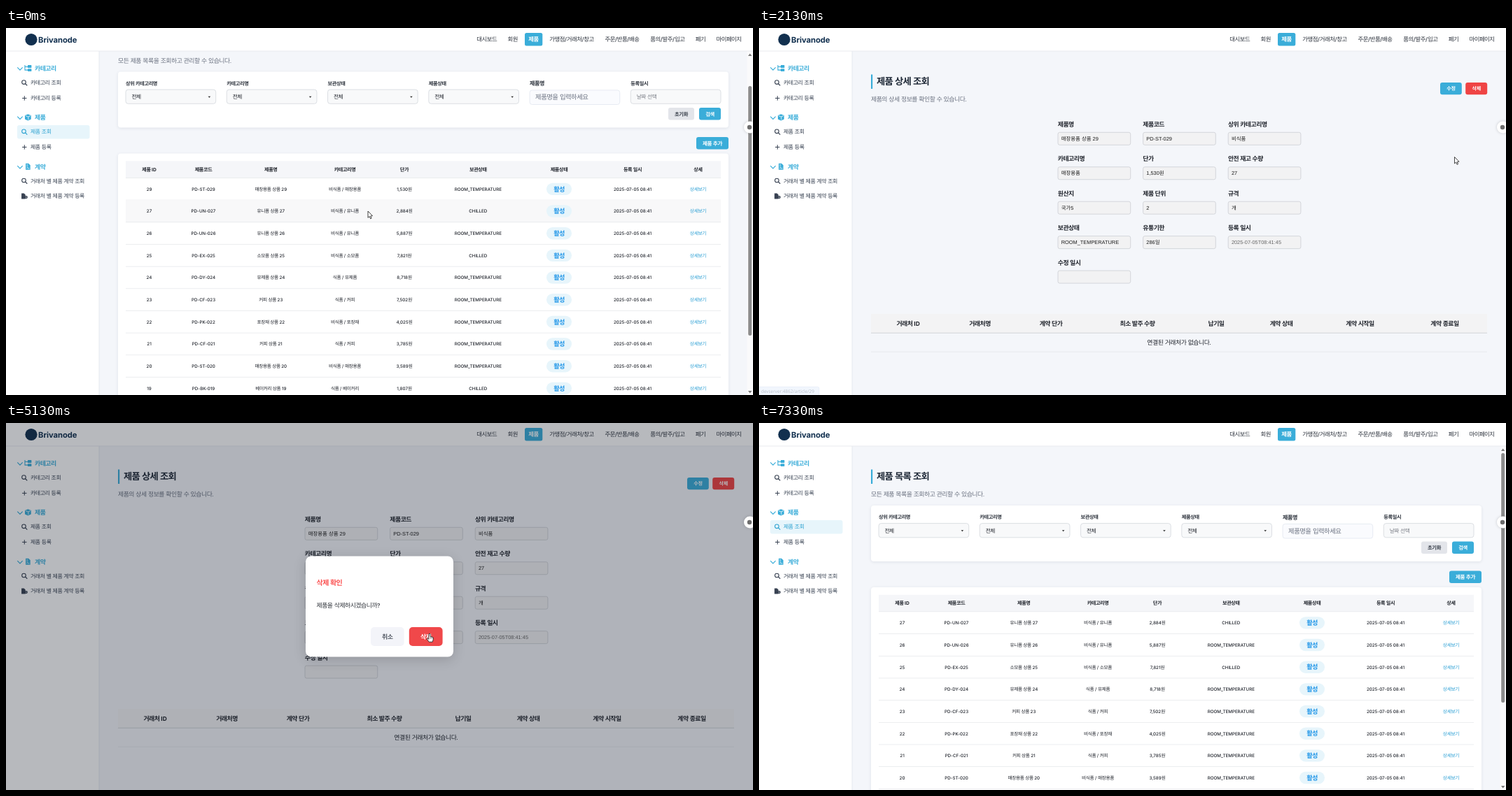
Animation of 1067x525 px, one loop 8.27 s. Source, as an HTML page with a canvas:

```html
<!DOCTYPE html>
<html lang="ko">
<head>
<meta charset="utf-8">
<title>제품 관리</title>
<style>
html, body { margin: 0; width: 100%; height: 100%; overflow: hidden; background: #f4f6fa; }
canvas { display: block; }
</style>
</head>
<body>
<canvas id="stage" width="1067" height="525"></canvas>
<script>
const ctx = document.getElementById('stage').getContext('2d');
const W = 1067, H = 525, LOOP = 8270, TICK = 1000 / 15;
const BLUE = '#3aadd9', INK = '#20242c', GREY = '#6b7280', LINE = '#e3e5e9', PAGE = '#f4f6fa';
const SCROLL = 55.5, ROW_H = 31.67;

const clamp = v => Math.max(0, Math.min(1, v));
const ramp = (t, a, b) => clamp((t - a) / (b - a));
const ease = p => p * p * (3 - 2 * p);
const mix = (a, b, p) => `rgb(${a.map((v, i) => Math.round(v + (b[i] - v) * p))})`;

// ---- drawing helpers ----
function rect(x, y, w, h, fill) {
  ctx.fillStyle = fill;
  ctx.fillRect(x, y, w, h);
}

function box(x, y, w, h, r, fill, stroke) {
  ctx.beginPath();
  ctx.roundRect(x, y, w, h, r);
  ctx.fillStyle = fill;
  ctx.fill();
  if (stroke) {
    ctx.strokeStyle = stroke;
    ctx.lineWidth = 0.7;
    ctx.stroke();
  }
}

function shadowBox(x, y, w, h, r, blur, dy, shade) {
  ctx.save();
  ctx.shadowColor = shade;
  ctx.shadowBlur = blur;
  ctx.shadowOffsetY = dy;
  box(x, y, w, h, r, '#fff');
  ctx.restore();
}

function disc(x, y, r, fill) {
  ctx.beginPath();
  ctx.arc(x, y, r, 0, 7);
  ctx.fillStyle = fill;
  ctx.fill();
}

function poly(points, fill, stroke, width = 1, closed = true) {
  ctx.beginPath();
  points.forEach(([x, y]) => ctx.lineTo(x, y));
  if (closed) ctx.closePath();
  if (fill) { ctx.fillStyle = fill; ctx.fill(); }
  if (stroke) { ctx.strokeStyle = stroke; ctx.lineWidth = width; ctx.stroke(); }
}

// Hangul is set a little tighter, Latin a little smaller
function setFont(run, size, weight) {
  const hangul = /[가-힣]/.test(run);
  ctx.font = `${weight} ${hangul ? size : size * 0.94}px Inter, "Noto Sans CJK KR", sans-serif`;
  ctx.letterSpacing = `${hangul ? -0.055 * size : -0.005 * size}px`;
}

// y is the vertical middle of the line; align 0 = left, 0.5 = centre
function text(s, x, y, size, color = INK, weight = 400, align = 0) {
  const runs = s.match(/[가-힣]+|[^가-힣]+/g);
  const widths = runs.map(r => (setFont(r, size, weight), ctx.measureText(r).width));
  x -= align * widths.reduce((a, b) => a + b, 0);
  ctx.fillStyle = color;
  runs.forEach((r, i) => {
    setFont(r, size, weight);
    ctx.fillText(r, x, y + size * 0.36);
    x += widths[i];
  });
}

function plain(s, x, y, size, color, family) {
  ctx.font = `${size}px ${family}, "Noto Sans CJK KR", sans-serif`;
  ctx.letterSpacing = '0px';
  ctx.fillStyle = color;
  ctx.fillText(s, x, y + size * 0.36);
}

function button(label, x, y, w, h, fill, color = '#fff', size = 7.1, r = 3) {
  box(x, y, w, h, r, fill);
  text(label, x + w / 2, y + h / 2 + 0.2, size, color, 700, 0.5);
}

// ---- icons, drawn around their centre ----
const icons = {
  search(x, y, c) {
    ctx.beginPath();
    ctx.arc(x - 0.8, y - 0.8, 2.8, 0, 7);
    ctx.strokeStyle = c;
    ctx.lineWidth = 1.1;
    ctx.stroke();
    poly([[x + 1.3, y + 1.3], [x + 4, y + 4]], null, c, 1.3, false);
  },
  plus(x, y, c) {
    rect(x - 3.2, y - 0.5, 6.4, 1, c);
    rect(x - 0.5, y - 3.2, 1, 6.4, c);
  },
  tree(x, y, c) {
    poly([[x - 4.4, y - 4.5], [x - 4.4, y + 2.6], [x, y + 2.6]], null, c, 1.1, false);
    rect(x - 4.4, y - 2.6, 4, 1.1, c);
    box(x - 0.4, y - 4.4, 5.4, 3.9, 0.6, c);
    box(x - 0.4, y + 0.7, 5.4, 3.9, 0.6, c);
  },
  cube(x, y, c) {
    poly([[x, y - 4.6], [x + 4.4, y - 2.7], [x + 4.4, y + 2.7], [x, y + 4.6], [x - 4.4, y + 2.7], [x - 4.4, y - 2.7]], c);
    poly([[x - 3.6, y - 2.3], [x, y - 0.8], [x + 3.6, y - 2.3]], null, '#fff', 0.8, false);
    rect(x + 0.1, y - 0.8, 0.8, 4.4, '#fff');
  },
  paper(x, y, c) {
    poly([[x - 3.3, y - 4.5], [x + 0.8, y - 4.5], [x + 3.3, y - 2], [x + 3.3, y + 4.5], [x - 3.3, y + 4.5]], c);
    rect(x - 2.1, y - 2.9, 2, 0.7, '#fff');
    rect(x - 2.1, y - 1.3, 2, 0.7, '#fff');
    poly([[x - 2, y + 2.8], [x - 0.8, y + 0.8], [x + 0.3, y + 2.6], [x + 2.2, y + 2.6]], null, '#fff', 0.7, false);
  },
  sign(x, y, c) {
    poly([[x - 4.2, y - 4], [x - 0.6, y - 4], [x + 1.4, y - 2], [x + 1.4, y + 4], [x - 4.2, y + 4]], c);
    disc(x + 2.5, y + 1.6, 2.1, c);
    disc(x + 2.5, y + 1.6, 0.7, '#fff');
  }
};

// ---- frame of the app ----
const nav = [['대시보드', 686.7], ['회원', 723.7], ['제품', 753.5], ['가맹점/거래처/창고', 808], ['주문/반품/배송', 880],
  ['품의/발주/입고', 944.8], ['폐기', 992], ['마이페이지', 1032.5]];

function header() {
  rect(0, 0, W, 33, '#fff');
  rect(0, 32.6, W, 0.8, '#e4e7ec');
  disc(36, 16.5, 8.6, '#12304f');
  text('Brivanode', 46, 16.6, 12, '#12304f', 700);
  box(741, 7, 25.3, 18.5, 2.5, BLUE);
  nav.forEach(([s, x]) => text(s, x, 16, 8.4, s === '제품' ? '#fff' : '#2b313b', s === '제품' ? 700 : 500, 0.5));
}

const groups = [['카테고리', 57.5, 'tree'], ['제품', 127.8, 'cube'], ['계약', 198.3, 'paper']];
const links = [['카테고리 조회', 78.4, 'search'], ['카테고리 등록', 100.4, 'plus'], ['제품 조회', 148.6, 'search'],
  ['제품 등록', 170.4, 'plus'], ['거래처 별 제품 계약 조회', 218.8, 'search'], ['거래처 별 제품 계약 등록', 240.5, 'sign']];

function sidebar(active, glow) {
  rect(0, 33, 133, H, '#fff');
  rect(132.6, 33, 0.8, H, '#e2e6ec');
  groups.forEach(([s, y, icon]) => {
    poly([[16.3, y - 1.2], [20, y + 2.6], [23.7, y - 1.2]], null, BLUE, 1.2, false);
    icons[icon](31.4, y, BLUE);
    text(s, 41, y, 8.9, BLUE, 700);
  });
  box(16, 139, 103.5, 19.4, 3, `rgba(231,245,251,${glow})`);
  links.forEach(([s, y, icon]) => {
    const c = active && s === '제품 조회' ? '#2ea3d1' : '#374151';
    icons[icon](26.3, y, c);
    text(s, 35, y, 7.95, c, 400);
  });
}

function heading(title, note, dy) {
  rect(160, 66.5 - dy, 2.2, 20.5, BLUE);
  text(title, 168, 76.6 - dy, 13.33, '#1f2937', 700);
  text(note, 160, 102 - dy, 8.89, GREY);
}

// ---- list page ----
const kinds = { ST: '매장용품', UN: '유니폼', EX: '소모품', DY: '유제품', CF: '커피', PK: '포장재', BK: '베이커리' };
const goods = [[29, 'ST', '1,530'], [27, 'UN', '2,884', 1], [26, 'UN', '5,887'], [25, 'EX', '7,821', 1], [24, 'DY', '8,718'],
  [23, 'CF', '7,502'], [22, 'PK', '4,025'], [21, 'CF', '3,785'], [20, 'ST', '3,589'], [19, 'BK', '1,807', 1]];
const heads = ['제품 ID', '제품코드', '제품명', '카테고리명', '단가', '보관상태', '제품상태', '등록 일시', '상세'];
const fullCols = [204.5, 282, 378.3, 484, 569, 674.3, 790, 895, 988.5];
const emptyCols = [218, 316, 411, 514, 608.7, 696, 798.7, 903.6, 993];
const filters = ['상위 카테고리명', '카테고리명', '보관상태', '제품상태', '제품명', '등록일시'];

function filterPanel(inner, dy) {
  const step = (inner + 15.56) / 6, w = step - 15.56, right = 171 + inner;
  shadowBox(160, 118 - dy, inner + 22, 80, 4, 4, 1, 'rgba(30,50,80,.1)');
  filters.forEach((s, i) => {
    const x = 171 + i * step, y = 143.6 - dy, mid = y + 10.2;
    text(s, x, 134.6 - dy, i === 4 ? 8.1 : 7.2, '#2b313b', 700);
    if (i === 4) {
      box(x, y + 0.8, w, 20.6, 3.5, '#fafbfe', '#dfe4ee');
      text('제품명을 입력하세요', x + 8, mid + 0.4, 9.4, GREY);
    } else {
      box(x, y, w, 20.2, 3.5, '#f8f9fa', '#cfd3d9');
      text(i < 4 ? '전체' : '날짜 선택', x + 8.4, mid, 7.7, i < 4 ? INK : '#7b7f87', i < 4 ? 500 : 400);
      const c = x + w - 9.3;
      if (i < 4) poly([[c - 1.8, mid - 0.6], [c + 1.8, mid - 0.6], [c, mid + 1.4]], '#222');
    }
  });
  button('초기화', right - 75, 169.6 - dy, 37, 17.3, '#e3e5ea', '#333a45', 7.3);
  button('검색', right - 31, 169.6 - dy, 31, 17.3, BLUE, '#fff', 7.3);
  button('제품 추가', right - 35, 211.6 - dy, 46, 17.3, BLUE, '#fff', 7.6);
}

function tableRow([id, code, price, cold], top, hover) {
  const y = top + ROW_H / 2, x = fullCols, kind = kinds[code];
  if (hover) rect(171, top, 850, ROW_H, '#f8f8f9');
  const group = 'DY CF BK'.includes(code) ? '식품' : '비식품';
  const cells = [`${id}`, `PD-${code}-0${id}`, `${kind} 상품 ${id}`, `${group} / ${kind}`, `${price}원`,
    cold ? 'CHILLED' : 'ROOM_TEMPERATURE', '', '2025-07-05 08:41'];
  cells.forEach((s, i) => s && text(s, x[i], y, 6.67, INK, 500, 0.5));
  box(x[6] - 18, y - 8.7, 36, 17.4, 8.7, '#e7f5fb');
  text('활성', x[6], y, 9.1, '#2196e8', 700, 0.5);
  text('상세보기', x[8], y, 6.75, '#2b9fd4', 500, 0.5);
  rect(171, top + ROW_H - 0.4, 850, 0.7, LINE);
}

function scrollbar(dy) {
  rect(1058.5, 33, 9, H, '#fafafb');
  box(1060.2, 43 + dy * 0.72, 5, 357, 2.5, '#8b8b8b');
  poly([[1060, 40], [1065.4, 40], [1062.7, 36.4]], '#777');
  poly([[1060, 519], [1065.4, 519], [1062.7, 522.6]], '#777');
}

function listPage(rows, dy, pointer) {
  const inner = rows ? 850 : 858, top = 270 - dy;
  heading('제품 목록 조회', '모든 제품 목록을 조회하고 관리할 수 있습니다.', dy);
  filterPanel(inner, dy);
  shadowBox(160, 235 - dy, inner + 22, rows ? 420 : 46, 4, 4, 1, 'rgba(30,50,80,.1)');
  rect(171, 245.8 - dy, inner, 24, '#f5f6f9');
  rect(171, top - 0.5, inner, 0.7, LINE);
  heads.forEach((s, i) => text(s, (rows ? fullCols : emptyCols)[i], 257.7 - dy, 7.1, INK, 700, 0.5));
  if (!rows) return;
  const over = pointer && pointer.x > 171 && pointer.x < 1021 ? Math.floor((pointer.y - top) / ROW_H) : -1;
  rows.forEach((r, i) => tableRow(r, top + i * ROW_H, i === over));
  scrollbar(dy);
}

// ---- detail page ----
const fields = [['제품명', '매장용품 상품 29'], ['제품코드', 'PD-ST-029'], ['상위 카테고리명', '비식품'], ['카테고리명', '매장용품'],
  ['단가', '1,530원'], ['안전 재고 수량', '27'], ['원산지', '국가5'], ['제품 단위', '2'], ['규격', '개'],
  ['보관상태', 'ROOM_TEMPERATURE'], ['유통기한', '286일'], ['등록 일시', '2025-07-05T08:41:45'], ['수정 일시', '']];
const deals = [['거래처 ID', 213], ['거래처명', 315.5], ['계약 단가', 417], ['최소 발주 수량', 540.5], ['납기일', 653],
  ['계약 상태', 746], ['계약 시작일', 858.5], ['계약 종료일', 979.5]];

function detailPage(loaded, hover) {
  heading('제품 상세 조회', '제품의 상세 정보를 확인할 수 있습니다.', 0);
  button('수정', 973, 78, 30.8, 17.2, BLUE);
  button('삭제', 1009.2, 78, 31, 17.2, mix([239, 68, 68], [220, 38, 38], hover));
  fields.forEach(([label, value], i) => {
    const x = 427 + (i % 3) * 121.6, y = 137.5 + Math.floor(i / 3) * 49.45;
    text(label, x - 0.3, y, 8.89, INK, 700);
    box(x, y + 11.8, 103.7, 18, 2.5, '#f2f2f3', '#c6c9ce');
    if (loaded) plain(value, x + 4.7, y + 20.8, 7.4, i === 11 ? '#666' : '#1b1b1b', '"Liberation Sans"');
  });
  rect(160, 409, 880, 27, '#f3f3f4');
  rect(160, 435.8, 880, 0.8, '#c9ccd0');
  deals.forEach(([s, x]) => text(s, x, 422.6, 8.89, INK, 700, 0.5));
  text('연결된 거래처가 없습니다.', 600, 449.8, 8.89, INK, 400, 0.5);
  rect(160, 462.8, 880, 0.7, LINE);
}

// ---- layers above the page ----
function dialog(done, shade, hover) {
  rect(0, 0, W, H, `rgba(17,24,39,${0.3 * shade})`);
  shadowBox(428, 190.5, 211, 144, 8, 18, 4, 'rgba(0,0,0,.16)');
  text(done ? '삭제 완료' : '삭제 확인', 443.5, 228.2, 10, done ? '#2490ea' : '#fb5252', 700);
  text(done ? '제품 정보가 성공적으로 삭제되었습니다.' : '제품을 삭제하시겠습니까?', 443.5, 261, 8.89, '#30343b', 500);
  if (!done) button('취소', 521, 292, 47.6, 27, '#f3f4f9', '#555b66', 8.89, 5);
  const fill = done ? mix([47, 128, 237], [32, 106, 212], hover) : mix([255, 99, 100], [240, 72, 74], hover);
  button(done ? '확인' : '삭제', 575.8, 292, 47.8, 27, fill, '#fff', 8.89, 5);
}

function statusBar(alpha) {
  if (!alpha) return;
  ctx.globalAlpha = alpha;
  box(-2, 513.3, 88, 14, [0, 2.5, 0, 0], '#d5e4f8', '#c0d2ea');
  plain('devserver:4862/article/29', 3, 519.4, 6.4, '#3d4a5c', '"Open Sans"');
  ctx.globalAlpha = 1;
}

function floatingButton() {
  shadowBox(1054, 133.5, 17, 17, 8.5, 4, 0, 'rgba(0,0,0,.18)');
  disc(1062, 142, 3.2, '#6c6c6c');
}

const arrow = [[0, 0], [0, 9.4], [2.1, 7.5], [3.6, 10.8], [5.1, 10.1], [3.7, 7], [6.5, 6.7]];
const hand = [[-1, 0.8], [0, 0], [1, 0.8], [1, 4.4], [2.6, 4.6], [4, 5.2], [5.2, 6], [5.2, 9], [4.2, 12.2],
  [-0.8, 12.2], [-3.6, 8.2], [-3.4, 7], [-2.4, 7], [-1, 8.4]];

function drawPointer({ x, y, press }) {
  ctx.lineJoin = 'round';
  poly((press ? hand : arrow).map(([a, b]) => [x + a, y + b]), '#fff', '#222', 0.85);
  if (press) for (const dx of [1, 2.5, 4]) rect(x + dx, y + 5, 0.5, 2.6, '#444');
  ctx.lineJoin = 'miter';
}

// start, end, from, to
const moves = [[67, 867, 517, 262, 978, 231], [1800, 2667, 978, 231, 1025, 90], [4067, 4800, 1025, 90, 607, 288],
  [4800, 5133, 607, 288, 605, 301], [6933, 7330, 604.5, 300.5, 96, 532]];

function pointerAt(t) {
  const m = moves.filter(v => t >= v[0]).pop() || moves[0];
  const p = ease(ramp(t, m[0], m[1]));
  const x = m[2] + (m[4] - m[2]) * p, y = m[3] + (m[5] - m[3]) * p;
  const press = t < 1460 ? x > 976 : t < 3990 ? t > 2000 && y < 95 : t > 4850 && t < 6190;
  return { x, y, press };
}

function draw(t) {
  const pointer = pointerAt(t);
  const detail = t > 1460 && t < 6190;
  rect(0, 0, W, H, PAGE);
  if (!detail) {
    const back = t > 6190;
    const rows = !back ? goods : t > 6250 ? goods.slice(1) : null;
    listPage(rows, back ? 0 : SCROLL, pointer);
  } else {
    detailPage(t > 1660, ramp(t, 2660, 2795) * (1 - ramp(t, 3960, 4130)));
  }
  sidebar(!detail, t < 6190 ? 1 - ramp(t, 1520, 1665) : ramp(t, 6185, 6330));
  header();
  if (t > 3990 && t < 5260) dialog(false, ramp(t, 3930, 4065), ramp(t, 4860, 5060));
  if (t > 5260 && t < 6190) dialog(true, ramp(t, 5200, 5395), ramp(t, 5200, 5395));
  statusBar(ramp(t, 790, 930) * (1 - ramp(t, 2000, 2200)));
  floatingButton();
  drawPointer(pointer);
}

ctx.textRendering = 'geometricPrecision';

function loop() {
  const t = performance.now() % LOOP;
  draw(Math.floor(t / TICK + 0.1) * TICK);
  requestAnimationFrame(loop);
}
loop();
</script>
</body>
</html>
```
